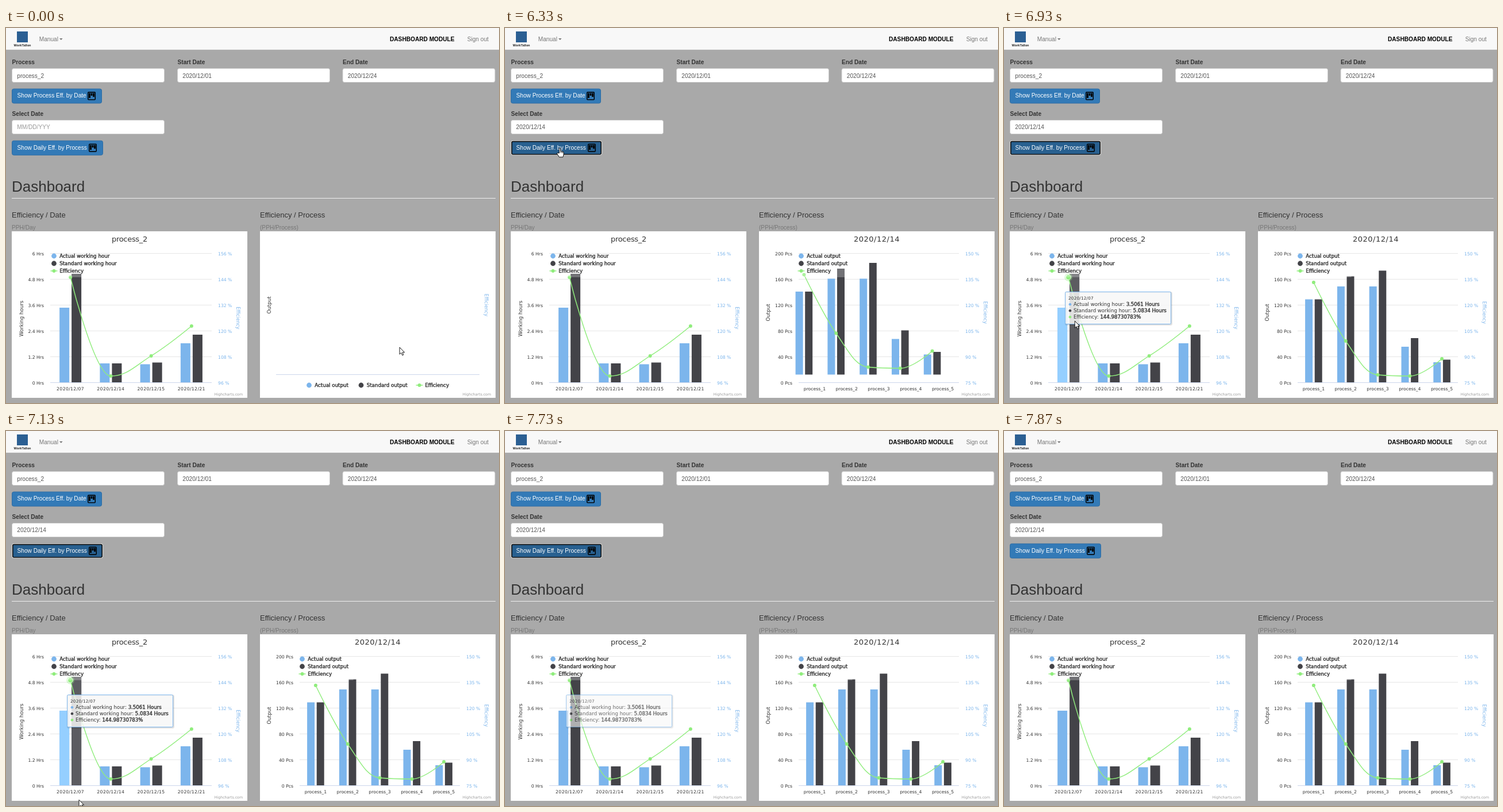
These frames come from a looping animation (858x653 px, 8070 ms). An HTML page:

```html
<!DOCTYPE html>
<html lang="en">
<head>
<meta charset="utf-8">
<title>Dashboard</title>
<style>
html, body { margin: 0; width: 100%; height: 100%; overflow: hidden; background: #a9a9a9; }
svg { display: block; width: 858px; height: 653px; font: 10.15px "Liberation Sans", Arial, sans-serif; }
text { white-space: pre; }
.bold { font-weight: bold; }
.chart { font-family: "DejaVu Sans", Verdana, sans-serif; font-size: 8.7px; fill: #333; }
.title { font-size: 13px; }
.tick { font-size: 7.7px; }
.date { letter-spacing: .37px; }
.blue { fill: #7cb5ec; }
.strong { stroke: #333; stroke-width: .4px; }
.credit { font-size: 6.25px; fill: #999; }
.head { font-size: 7.25px; letter-spacing: .2px; }
</style>
</head>
<body>
<svg id="stage" viewBox="0 0 858 653"></svg>
<script>
const LOOP = 8070, STEP = 200 / 3;
const BLUE = '#7cb5ec', DARK = '#434348', GREEN = '#90ed7d';

const text = (x, y, s, attrs = '') => `<text x="${x}" y="${y}" ${attrs}>${s}</text>`;
const rect = (x, y, w, h, fill, attrs = '') =>
  `<rect x="${x}" y="${y}" width="${w}" height="${h}" fill="${fill}" ${attrs}/>`;
const dot = (x, y, r, fill, attrs = '') => `<circle cx="${x}" cy="${y}" r="${r}" fill="${fill}" ${attrs}/>`;
const hline = (x1, x2, y, color) => `<path d="M${x1} ${y}H${x2}" stroke="${color}"/>`;
const group = (id, body, attrs = '') => `<g id="${id}" ${attrs}>${body}</g>`;
const turned = (x, y, angle, s, attrs = '') =>
  text(0, 3, s, `transform="translate(${x} ${y}) rotate(${angle})" text-anchor="middle" ${attrs}`);

function input(x, y, label, value) {
  return text(x + .5, y - 7.3, label, 'class="bold" fill="#333"') +
    rect(x + .5, y + .5, 265, 24, '#fff', 'rx="3" stroke="#ccc"') +
    (value ? text(x + 9.3, y + 16.5, value, 'fill="#555"') : '');
}

function boardIcon(x, y, back) {
  return rect(x, y, 14, 14.5, '#000', 'rx="1.8"') + rect(x + 1.5, y + 1.5, 11, 11.5, back) +
    [8.5, 4.5, 6.5].map((h, i) => rect(x + 2.2 + i * 3.5, y + 2.3, 2.7, h, '#000')).join('');
}

function button(y, w, label, focused) {
  const fill = focused ? '#286090' : '#337ab7';
  const frame = focused
    ? rect(10.5, y + .5, w - 1, 25, '#fff', 'rx="2.5"') + rect(11.8, y + 1.8, w - 3.6, 22.4, fill, 'rx="2" stroke="#101010" stroke-width="1.6"')
    : rect(10.5, y + .5, w - 1, 25, fill, 'rx="3" stroke="#2e6da4"');
  return frame + text(19.5, y + 15.8, label, 'fill="#fff"') + boardIcon(w - 15, y + 5.6, fill);
}

// Smooth curve through points, without overshoot at the extremes.
function spline(points) {
  let d = `M${points[0]}`, out = points[0];
  for (let i = 1; i < points.length; i++) {
    const last = points[i - 1], [x, y] = points[i], next = points[i + 1];
    let left = [x, y], right = [x, y];
    if (next) {
      const lx = (1.5 * x + last[0]) / 2.5, rx = (1.5 * x + next[0]) / 2.5;
      let ly = (1.5 * y + last[1]) / 2.5, ry = (1.5 * y + next[1]) / 2.5;
      const shift = (ry - ly) * (rx - x) / (rx - lx) + y - ry;
      ly += shift;
      ry += shift;
      const limit = Math.min(Math.max(ly, Math.min(last[1], y)), Math.max(last[1], y));
      if (limit !== ly) { ly = limit; ry = 2 * y - ly; }
      const bound = Math.min(Math.max(ry, Math.min(next[1], y)), Math.max(next[1], y));
      if (bound !== ry) { ry = bound; ly = 2 * y - ry; }
      left = [lx, ly];
      right = [rx, ry];
    }
    d += `C${out} ${left} ${x},${y}`;
    out = right;
  }
  return d;
}

function bars(c, tops, offset, fill) {
  return tops.map((top, i) =>
    rect(c.x + c.pitch * (i + .5) + offset - c.bar / 2, top, c.bar, 617 - top, fill)).join('');
}

function columns(c) {
  return bars(c, c.actual, -c.gap, BLUE) + bars(c, c.standard, c.gap, DARK);
}

function curve(c) {
  const points = c.line.map((y, i) => [c.x + c.pitch * (i + .5), y]);
  return `<path d="${spline(points)}" fill="none" stroke="${GREEN}" stroke-width="1.45"/>` +
    points.map(([x, y]) => dot(x, y, 3, GREEN)).join('');
}

function legendItem(i, x, y, label) {
  const mark = i < 2 ? dot(x, y, 4.4, [BLUE, DARK][i])
    : `<path d="M${x - 6} ${y}h12" stroke="${GREEN}" stroke-width="1.45"/>` + dot(x, y, 3, GREEN);
  return mark + text(x + 9.7, y + 3.1, label, 'class="strong"');
}

function legend(x, w, labels) {
  return rect(x - 5, 393, w, 41, '#fff', 'opacity=".25"') +
    labels.map((s, i) => legendItem(i, x, 397 + 13 * i, s)).join('');
}

function axes(c) {
  const right = c.x + c.pitch * c.names.length;
  let out = text((c.panel * 2 + 410) / 2, 371.5, c.title, `class="title" text-anchor="middle" letter-spacing="${c.spacing}"`);
  for (let i = 0; i < 6; i++) {
    const y = 392.5 + 45 * i;
    out += hline(c.x, right, y, i < 5 ? '#e6e6e6' : '#ccd6eb') +
      text(c.x - 11, y + 3.2, c.left(5 - i), 'class="tick" text-anchor="end"') +
      text(right + 11, y + 3.2, c.right(5 - i) + ' %', 'class="tick blue"');
  }
  return out + c.names.map((s, i) =>
    text(c.x + c.pitch * (i + .5), 631.3, s, `class="tick ${c.nameClass}" text-anchor="middle"`)).join('');
}

const byDate = {
  panel: 10, x: 77, pitch: 70.25, gap: 10.5, bar: 17, title: 'process_2', spacing: -.3,
  names: ['07', '14', '15', '21'].map(d => '2020/12/' + d), nameClass: 'date',
  left: i => +(1.2 * i).toFixed(1) + ' Hrs', right: i => 96 + 12 * i,
  actual: [487, 584, 585.5, 549], standard: [428, 584, 582.5, 534], line: [434, 606, 571, 519]
};
const byProcess = {
  panel: 442, x: 511, pitch: 55.8, gap: 8.3, bar: 13, title: '2020/12/14', spacing: .5,
  names: [1, 2, 3, 4, 5].map(n => 'process_' + n), nameClass: '',
  left: i => 40 * i + ' Pcs', right: i => 75 + 15 * i,
  actual: [472.5, 450, 450, 555, 582], standard: [472.5, 432.5, 422.5, 540, 577.5], line: [443, 545, 604, 606, 576]
};
const hourLabels = ['Actual working hour', 'Standard working hour', 'Efficiency'];
const outputLabels = ['Actual output', 'Standard output', 'Efficiency'];

function page() {
  const heading = (x, title, sub) => text(x, 329.5, title, 'font-size="13" fill="#333"') +
    text(x, 350.7, sub, 'fill="#777"') + rect(x, 354, 410, 290, '#fff');
  return rect(0, 0, 858, 653, '#a9a9a9') + rect(0, 0, 858, 38, '#f8f8f8') + hline(0, 858, 37.5, '#e7e7e7') +
    rect(19, 6, 19, 19, '#2b5f93') +
    text(28.5, 32.3, 'WorkTallon', 'class="bold" font-size="5.6" text-anchor="middle" fill="#222"') +
    text(57.8, 22.6, 'Manual', 'fill="#777"') + '<path d="M93 18h5.6l-2.8 3z" fill="#777"/>' +
    text(668, 22.6, 'DASHBOARD MODULE', 'class="bold"') + text(802.7, 22.6, 'Sign out', 'fill="#777"') +
    input(10, 70, 'Process', 'process_2') + input(298, 70, 'Start Date', '2020/12/01') +
    input(585.5, 70, 'End Date', '2020/12/24') + input(10, 160, 'Select Date') +
    group('emptyDate', text(19.3, 176.3, 'MM/DD/YYY', 'fill="#999"')) +
    group('pickedDate', text(19.3, 176.3, '2020/12/14', 'fill="#555"')) +
    button(105.5, 157, 'Show Process Eff. by Date') +
    group('idle', button(195.8, 159, 'Show Daily Eff. by Process')) +
    group('focused', button(195.8, 159, 'Show Daily Eff. by Process', true)) +
    text(10, 285, 'Dashboard', 'font-size="26" fill="#333"') + hline(10, 852, 296.5, '#eee') +
    heading(10, 'Efficiency / Date', 'PPH/Day') + heading(442, 'Efficiency / Process', '(PPH/Process)');
}

function tooltip() {
  const rows = [['Actual working hour: ', '3.5061 Hours'], ['Standard working hour: ', '5.0834 Hours'], ['Efficiency: ', '144.98730783%']];
  return rect(107.5, 460.5, 184, 56, 'none', 'rx="2" stroke="#000" stroke-opacity=".12" stroke-width="3"') +
    rect(106.5, 459.5, 184, 56, '#f7f7f7', `rx="2" fill-opacity=".85" stroke="${BLUE}"`) +
    text(112, 473, '2020/12/07', 'class="head"') +
    rows.map(([label, value], i) => dot(115, 481.3 + 11 * i, 2.3, [BLUE, DARK, GREEN][i]) +
      text(121, 484.3 + 11 * i, `${label}<tspan class="strong">${value}</tspan>`, 'font-size="8.6"')).join('');
}

function dateChart() {
  const lit = { ...byDate };
  return axes(byDate) + turned(26.5, 506, -90, 'Working hours') +
    turned(404, 505, 90, 'Efficiency', 'class="blue" font-size="8.2"') + columns(byDate) +
    group('lit', bars(lit, [487], -10.5, '#95cfff') + bars(lit, [428], 10.5, '#5c5c61')) + curve(byDate) +
    group('halo', dot(112.1, 434, 7, GREEN, 'opacity=".35"') + dot(112.1, 434, 4.4, GREEN, 'stroke="#fff" stroke-width=".7"')) +
    legend(83.5, 122, hourLabels) + text(412, 640.3, 'Highcharts.com', 'class="credit" text-anchor="end"');
}

function processChart() {
  const titles = y => turned(458, y, -90, 'Output') + turned(835.5, y, 90, 'Efficiency', 'class="blue" font-size="8.2"');
  const empty = titles(482.5) + hline(470, 824, 603.5, '#ccd6eb') +
    [527.5, 618, 719.5].map((x, i) => legendItem(i, x, 622, outputLabels[i])).join('');
  const filled = axes(byProcess) + titles(495.5) + group('series', columns(byProcess) + curve(byProcess)) +
    legend(515.5, 94, outputLabels);
  return group('empty', empty) + group('filled', filled) +
    text(844, 640.3, 'Highcharts.com', 'class="credit" text-anchor="end"');
}

const cursors =
  group('arrow', '<path d="M0 0V12.2L2.8 9.6 4.8 14 6.8 13.1 4.9 8.9H8.6Z" fill="#fff" stroke="#000" stroke-width=".9"/>') +
  group('hand', '<path d="M-1.2 9V1.2a1.2 1.2 0 0 1 2.4 0V5.5q1.2-.8 2 .5 1.2-.7 1.9.5 1.3-.4 1.5.9V11L5.4 15.8H-1.2L-4.8 10q-.6-1.5.8-1.6Z" fill="#fff" stroke="#000" stroke-width=".9"/><path d="M1.2 5.5V8.5M3.2 6V8.7M5.1 6.5V8.9" stroke="#000" stroke-width=".7"/>') +
  group('beam', '<path d="M-2.5-5.5H-.7L0-5 .7-5.5H2.5M0-5V5M-2.5 5.5H-.7L0 5 .7 5.5H2.5" fill="none" stroke="#333" stroke-width=".9"/>');

document.getElementById('stage').innerHTML = page() +
  `<g class="chart">${dateChart()}${processChart()}${group('tip', tooltip())}</g>` + cursors;

const part = id => document.getElementById(id);
const show = (id, on) => part(id).setAttribute('visibility', on ? 'visible' : 'hidden');
const fade = (id, value) => part(id).setAttribute('opacity', Math.max(0, Math.min(1, value)));

function pointer(t) {
  if (t < 70) return ['arrow', 685, 556];
  if (t < 6330) return ['arrow', 395, 393.5];
  if (t < 6600) return ['hand', 95.5, 209];
  const travel = (t - 6600) / 533;
  return [travel < .05 ? 'beam' : 'arrow', 117 + 10 * travel, 290 + 352 * travel];
}

function render(ms) {
  const t = ms < 6596 ? ms : Math.floor((ms + 3.5) / STEP) * STEP + .01;
  const loaded = t >= 6330, focus = loaded && ms < 7870;
  show('emptyDate', !loaded);
  show('pickedDate', loaded);
  show('empty', !loaded);
  show('filled', loaded);
  show('focused', focus);
  show('idle', !focus);
  part('series').setAttribute('transform', t < 6596 ? 'translate(-18.5 -13.5)' : '');

  const entered = t >= 6790;
  const hover = entered ? 1 - Math.max(0, t - 7190) / 500 : 0;
  fade('lit', hover);
  fade('halo', hover);
  fade('tip', entered ? 1 - Math.max(0, t - 7690) / 150 : 0);

  const [kind, x, y] = pointer(t);
  for (const id of ['arrow', 'hand', 'beam']) show(id, id === kind);
  part(kind).setAttribute('transform', `translate(${x} ${y})`);
}

const start = performance.now();
function tick() {
  render((performance.now() - start) % LOOP);
  requestAnimationFrame(tick);
}
tick();
</script>
</body>
</html>
```
